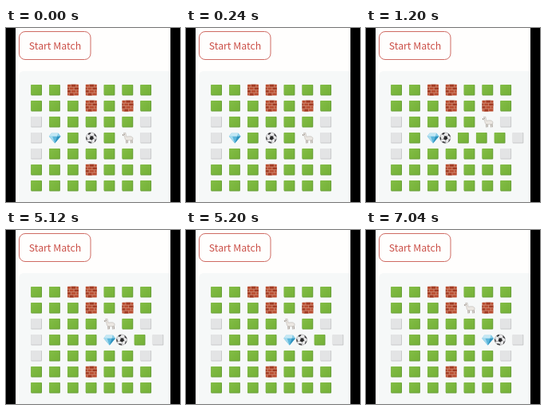
Recreate the animation shown at these times as an HTML page. Size 218x218 px, loop 8 s.

```html
<!DOCTYPE html>
<html lang="en">
<head>
<meta charset="utf-8">
<title>Match board</title>
<style>
  html, body { margin: 0; height: 100%; overflow: hidden; background: #000; }
  svg { display: block; width: 100vw; height: 100vh; }
  text { font: 12.3px "Noto Sans CJK JP", "Noto Sans CJK SC", "Noto Sans CJK", Lato, sans-serif; }
</style>
</head>
<body>
<svg viewBox="0 0 218 218">
  <defs>
    <linearGradient id="grass" x2="1" y2="1">
      <stop stop-color="#82bd45"/><stop offset="1" stop-color="#75b138"/>
    </linearGradient>
    <clipPath id="round"><circle cx="7.6" cy="7.6" r="6.8"/></clipPath>
    <g id="G">
      <rect x=".6" y=".9" width="13.7" height="13.6" rx=".9" fill="#669e36"/>
      <rect x=".6" y=".9" width="12.7" height="12.6" rx=".8" fill="url(#grass)"/>
    </g>
    <g id="W">
      <rect x=".6" y=".9" width="13.7" height="13.6" rx=".9" fill="#c8c9ca"/>
      <rect x=".6" y=".9" width="12.7" height="12.6" rx=".8" fill="#e3e4e5"/>
    </g>
    <g id="R">
      <rect x=".6" y=".8" width="13.9" height="13.7" rx=".5" fill="#b94c2f"/>
      <path d="M5.200 .8h6v3h-6zM.6 4.400h2v3h-2zM9 4.400h5.500v3H9zM.6 7.900H5v3H.6zM3 11.400h5.500v3H3z" fill="#a23b23"/>
      <path d="M.6 4.100h13.900M.6 7.600h13.900M.6 11.100h13.900M5 .8v3.300M11.400 .8v3.300M2.800 4.100v3.500M8.700 4.100v3.500M5 7.600v3.500M11.400 7.600v3.500M2.800 11.100v3.400M8.700 11.100v3.400"
        fill="none" stroke="#d49a83" stroke-width=".7"/>
    </g>
    <g id="D">
      <path d="M3.300 1.700h8.600l3 4-7.300 8.900L.3 5.700z" fill="#5db7dc"/>
      <path d="M3.300 1.700L4.600 5.700H.3zM3.300 1.700h8.600l-1.300 4h-6z" fill="#c4e8f4"/>
      <path d="M11.900 1.700l-1.300 4h4.300z" fill="#8acde6"/>
      <path d="M.3 5.700h4.300l3 8.900z" fill="#a2d9ed"/>
      <path d="M10.600 5.700h4.300l-7.300 8.900z" fill="#2f92be"/>
    </g>
    <g id="B">
      <circle cx="7.6" cy="7.6" r="6.8" fill="#e9e9ea"/>
      <g clip-path="url(#round)">
        <path d="M6.500 5.200l3.200.4 1 2.900-2.400 2.100-2.900-1.400zM2.500 1.500l4.200-1 .3 1.700-2.600 1.700zM0 6l1.900.6.8 3L1 11zM11 1l4 4-.9 1.600-2.700-2zM12.400 9.700l2.600-.5-1.500 4.800-2-1.300zM4.500 12l3.300 1 .2 2-5-1z" fill="#29292b"/>
        <path d="M6.500 5.200L5.200 3.500M9.700 5.600l1.700-1M10.700 8.500l1.700 1.200M8.300 10.600L7.800 13M5.400 9.200l-2.700.4" stroke="#8b8b8d" stroke-width=".6"/>
      </g>
      <circle cx="7.6" cy="7.6" r="6.6" fill="none" stroke="#88898b" stroke-width=".5"/>
    </g>
    <g id="L">
      <path d="M5.700 9.500l.2 5M7.300 9.800v4.400M11.500 9l.3 5.500M13 8.500l.5 5.700" stroke="#a0968d" stroke-width=".9"/>
      <path d="M2.900 .9l.8 1.300L4.700 .9l.6 2.200c.5 1.300.4 2.300.8 3.200 1.900-.5 4.800-.8 6.600 0 1.600.8 1.500 2.800.8 4.100-2 .4-5.800.5-8.300 0C4 9.500 3.800 7.200 3.700 4.900L1.500 4.800 1 3.800l1.700-1z"
        fill="#ebe7e2" stroke="#b0aaa4" stroke-width=".5"/>
      <path d="M1 3.700l1-.4.1 1.400-.7.100z" fill="#857a72"/>
      <circle cx="3.400" cy="3.200" r=".45" fill="#332d2a"/>
    </g>
  </defs>
  <path d="M12 0h194v218H12z" fill="#fffefd"/>
  <path d="M206 56q-1-2-4-2H22a6 6 0 0 0-6 6v158h190z" fill="#f6f8f8"/>
  <rect x="16.500" y="4.500" width="89.500" height="35" rx="7.500" fill="#fffefd" stroke="#cf6a62"/>
  <text x="61.500" y="27" text-anchor="middle" fill="#cb5048">Start Match</text>
  <g id="board"></g>
</svg>
<script>
  const LOOP = 8000, SIZE = 15.25, GAP = 7.6, LEFT = 30.7, TOP = 70, ROW = 20;
  const field = [
    'G G R R G G G',
    'G G G R G R G',
    'W G G G G G W',
    'W G G G G G W',
    'W G G G G G W',
    'G G G R G G G',
    'G G G G G G G'
  ];
  // Each move: start time, then [column, row] of diamond, llama and ball.
  const moves = [
    [0, [1, 3], [5, 3], [3, 3]],
    [1200, [2, 3], [5, 2], [2, 3]],
    [3200, [3, 3], [4, 2], [4, 2]],
    [5120, [4, 3], [4, 2], [4, 3]],
    [7040, [5, 3], [4, 1], [5, 3]]
  ];
  const board = document.getElementById('board');
  let shown;

  // Two pieces sharing a cell push the rest of their row to the right.
  function drawBoard([, ...places]) {
    let html = '';
    field.forEach((line, y) => {
      let x = LEFT;
      line.split(' ').forEach((ground, column) => {
        const pieces = [...'DLB'].filter((_, i) => places[i][0] === column && places[i][1] === y);
        for (const name of pieces.length ? pieces : [ground]) {
          html += `<use href="#${name}" x="${x}" y="${TOP + y * ROW}"/>`;
          x += SIZE;
        }
        x += GAP;
      });
    });
    board.innerHTML = html;
  }

  function tick() {
    const time = performance.now() % LOOP;
    const move = moves.findLast(([start]) => start <= time);
    if (move !== shown) drawBoard(shown = move);
    requestAnimationFrame(tick);
  }
  tick();
</script>
</body>
</html>
```
